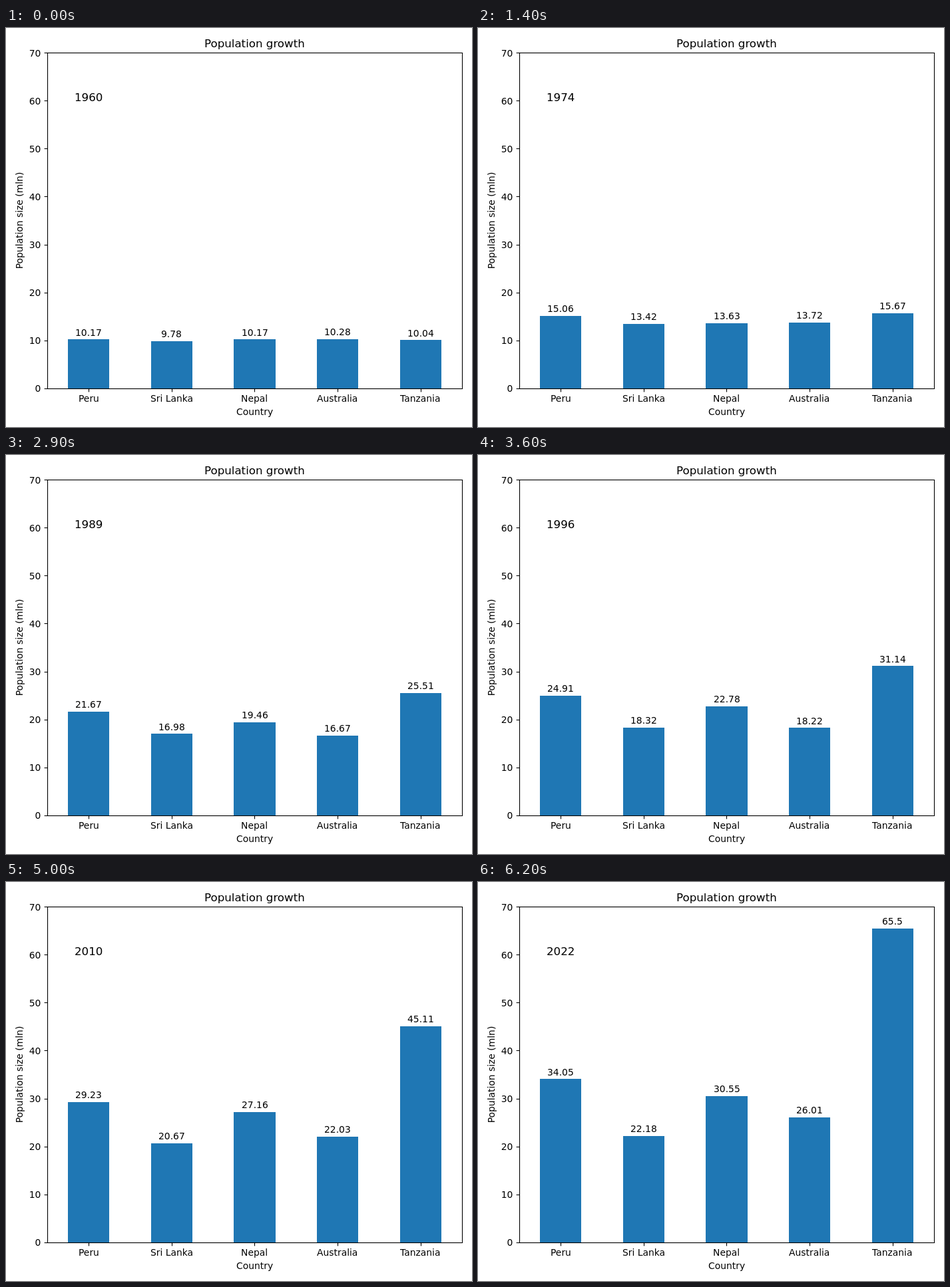
Animation of 700 by 600 pixels, one loop 6.3 s. Source, as an HTML page:

```html
<!DOCTYPE html>
<html lang="en">
<head>
<meta charset="utf-8">
<title>Population growth</title>
<style>
  html, body { margin: 0; width: 100%; height: 100%; overflow: hidden; background: #fff; }
  svg { display: block; }
  text { font: 13.89px "DejaVu Sans", sans-serif; fill: #000; }
  .big { font-size: 16.67px; }
  .end { text-anchor: end; }
  .mid { text-anchor: middle; }
  line, .frame { stroke: #000; stroke-width: 1.11; fill: none; }
  .bar { fill: #1f77b4; }
</style>
</head>
<body>
<svg id="chart" width="700" height="600" viewBox="0 0 700 600"></svg>
<script>
const STEP = 100, COUNT = 63;
const RIGHT = 685, ZERO = 541.75, UNIT = 7.207;

// Population in millions at a few key years; a smooth curve runs through them.
const years = [1960, 1974, 1983, 1996, 2004, 2010, 2022];
const data = {
  'Peru': [10.17, 15.06, 18.83, 24.91, 27.89, 29.23, 34.05],
  'Sri Lanka': [9.78, 13.42, 15.66, 18.32, 19.49, 20.67, 22.18],
  'Nepal': [10.17, 13.63, 16.74, 22.78, 26, 27.16, 30.55],
  'Australia': [10.28, 13.72, 15.39, 18.22, 19.93, 22.03, 26.01],
  'Tanzania': [10.04, 15.67, 21.17, 31.14, 38.36, 45.11, 65.5]
};
const names = Object.keys(data);

const svg = document.getElementById('chart');
function set(el, attrs) {
  for (const key in attrs) el.setAttribute(key, attrs[key]);
  return el;
}
function add(tag, attrs, text) {
  const el = document.createElementNS('http://www.w3.org/2000/svg', tag);
  if (text !== undefined) el.textContent = text;
  svg.appendChild(el);
  return set(el, attrs);
}
// Centre text on cx, starting on a whole pixel
function center(el, cx) {
  set(el, { x: Math.round(cx - el.getComputedTextLength() / 2) });
}

const yOf = v => ZERO - v * UNIT;
const snap = v => Math.round(v) + 0.5;
const label = v => Number.isInteger(v) ? v + '.0' : String(v);

function secant(vals, i) {
  return (vals[i + 1] - vals[i]) / (years[i + 1] - years[i]);
}
// Monotone slope at a key year; all series only grow
function slope(vals, i) {
  if (i === 0) return secant(vals, 0);
  if (i === years.length - 1) return secant(vals, i - 1);
  const p = years[i] - years[i - 1], q = years[i + 1] - years[i];
  return 3 * (p + q) / ((2 * q + p) / secant(vals, i - 1) + (q + 2 * p) / secant(vals, i));
}
function valueAt(vals, year) {
  let i = 0;
  while (i < years.length - 2 && year >= years[i + 1]) i++;
  const h = years[i + 1] - years[i], s = (year - years[i]) / h, r = 1 - s;
  const v = vals[i] * r * r * (1 + 2 * s) + vals[i + 1] * s * s * (3 - 2 * s)
    + h * s * r * (slope(vals, i) * r - slope(vals, i + 1) * s);
  return Math.round(v * 100) / 100;
}

const bars = names.map(name => ({
  rect: add('rect', { class: 'bar' }),
  tick: add('line', { y1: 542.5, y2: 547.4 }),
  name: add('text', { y: 562 }, name),
  value: add('text', {})
}));
const scale = Array.from({ length: 8 }, (_, i) => {
  const y = yOf(i * 10);
  return {
    tick: add('line', { y1: snap(y), y2: snap(y) }),
    text: add('text', { class: 'end', y: Math.round(y + 5.4) }, i * 10)
  };
});
const frame = add('rect', { class: 'frame', y: 37.5, height: 505 });
const title = add('text', { class: 'big', y: 29 }, 'Population growth');
const xLabel = add('text', { y: 582 }, 'Country');
const yLabel = add('text', { class: 'mid' }, 'Population size (mln)');
const yearText = add('text', { class: 'big', y: 110 });

function draw(ms) {
  const year = years[0] + Math.floor(ms / STEP) % COUNT;
  const values = names.map(name => valueAt(data[name], year));

  // The margin widens while the automatic tick step would be 2.5
  const auto = Math.max(...values) * 1.05 / 9;
  const left = auto > 2 && auto <= 2.5 ? 75.2 : 61.9;
  const slot = (RIGHT - left) / names.length;
  const mid = (left + RIGHT) / 2;
  const edge = snap(left);

  bars.forEach((bar, i) => {
    const cx = left + slot * (i + 0.5), top = yOf(values[i]);
    const x = Math.round(cx - slot / 4), y = Math.round(top);
    set(bar.rect, { x, y, width: Math.round(cx + slot / 4) - x, height: 542 - y });
    set(bar.tick, { x1: snap(cx), x2: snap(cx) });
    center(bar.name, cx);
    set(bar.value, { y: Math.round(top - 5.8) }).textContent = label(values[i]);
    center(bar.value, cx);
  });
  for (const mark of scale) {
    set(mark.tick, { x1: edge - 4.9, x2: edge });
    set(mark.text, { x: left - 9.6 });
  }
  set(frame, { x: edge, width: RIGHT + 0.5 - edge });
  center(title, mid);
  center(xLabel, mid);
  set(yLabel, { transform: `translate(${Math.round(left - 37)} 289.5) rotate(-90)` });
  yearText.textContent = year;
  center(yearText, left + slot / 2);
}

function loop() {
  draw(performance.now());
  requestAnimationFrame(loop);
}
loop();
</script>
</body>
</html>
```
